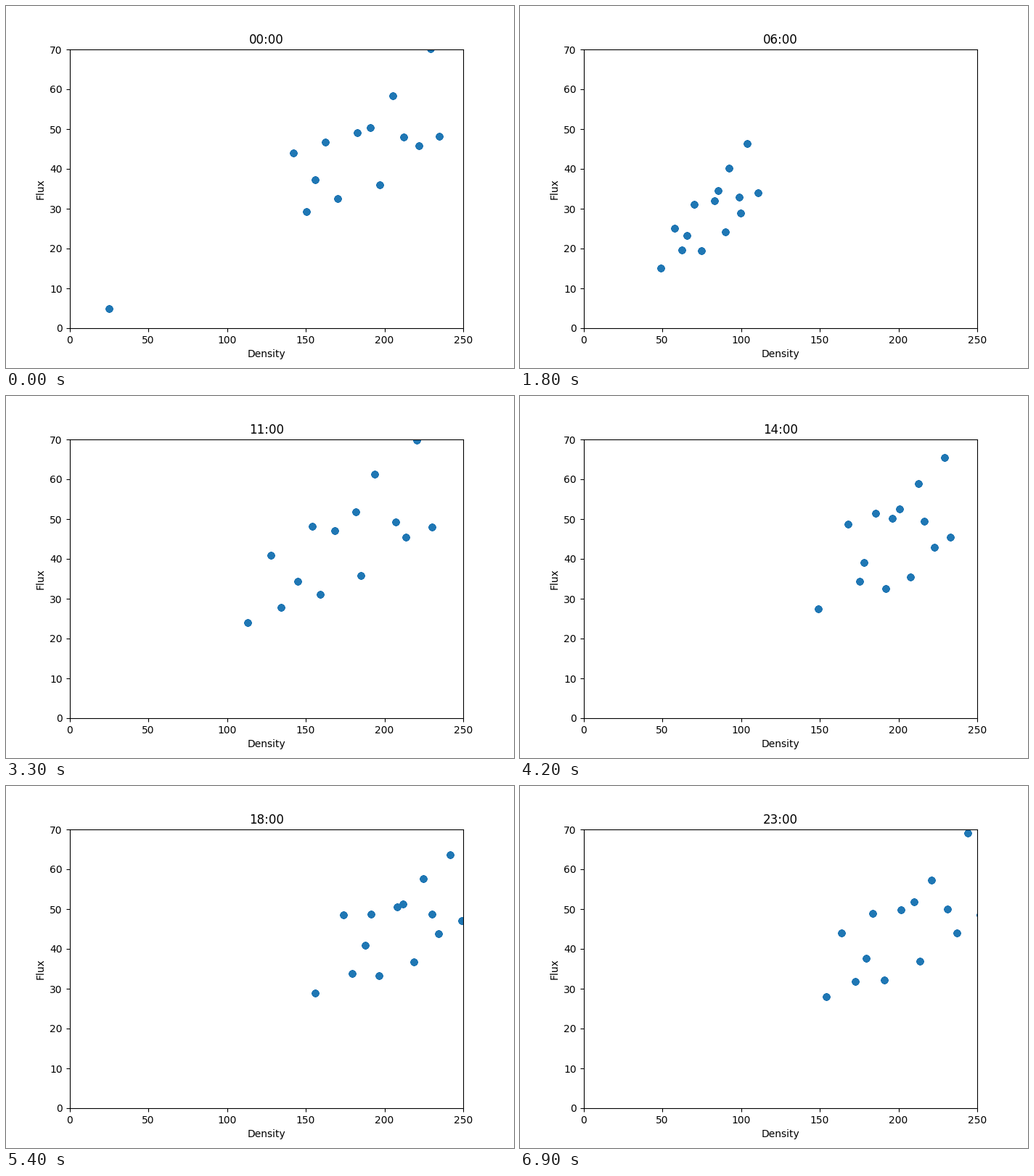
Animation of 700 by 500 pixels, one loop 7200 ms. Source, as a matplotlib script:

```python
import numpy as np
import matplotlib.pyplot as plt
from matplotlib.animation import FuncAnimation

plt.rcParams["text.kerning_factor"] = 6  # whole-pixel kerning

HOURS = 24
DOTS = 13    # dots in the main cloud, besides the one that trails it
LAYERS = 24  # stacked markers give the dots their hard rim

# Key points of the day: hour, then density of the trailing dot
# and of the two ends of the cloud.
DAY = np.array([
    (0, 25, 142, 235),
    (1, 59, 76, 197),
    (2, 74, 86, 159),
    (6, 49, 58, 111),
    (10, 96, 108, 177),
    (11, 113, 128, 230),
    (14, 149, 168, 233),
    (18, 156, 174, 249),
    (21, 150, 165, 240),
    (22, 108, 160, 240),
    (23, 154, 164, 252),
])


def cloud(hour):
    """Density and flux of every dot: flux is density times speed."""
    trail, low, high = (np.interp(hour, DAY[:, 0], col) for col in DAY.T[1:])
    rng = np.random.default_rng(hour)
    density = np.append(trail, np.linspace(low, high, DOTS))
    density[2:-1] += rng.uniform(-3, 3, DOTS - 2)

    # Denser traffic is slower; fast and slow dots take turns along the cloud.
    speed = 0.45 - 0.0011 * (low + high) / 2
    swing = np.cos(2 * np.pi * (np.arange(DOTS + 1) - 1) / 2.75)
    noise = rng.uniform(-0.04, 0.04, DOTS + 1)
    flux = density * speed * (1 + 0.25 * swing + noise)
    return np.column_stack([density, flux])


fig, ax = plt.subplots(figsize=(7, 5), dpi=100)
ax.set(xlim=(0, 250), ylim=(0, 70), xlabel="Density", ylabel="Flux")
title = ax.set_title("00:00")
dots = ax.scatter([], [], color="tab:blue")


def update(hour):
    dots.set_offsets(np.tile(cloud(hour), (LAYERS, 1)))
    title.set_text(f"{hour:02d}:00")
    return dots, title


anim = FuncAnimation(fig, update, frames=HOURS, interval=300, repeat=True,
                     init_func=lambda: update(0), blit=False)
plt.show()
```
